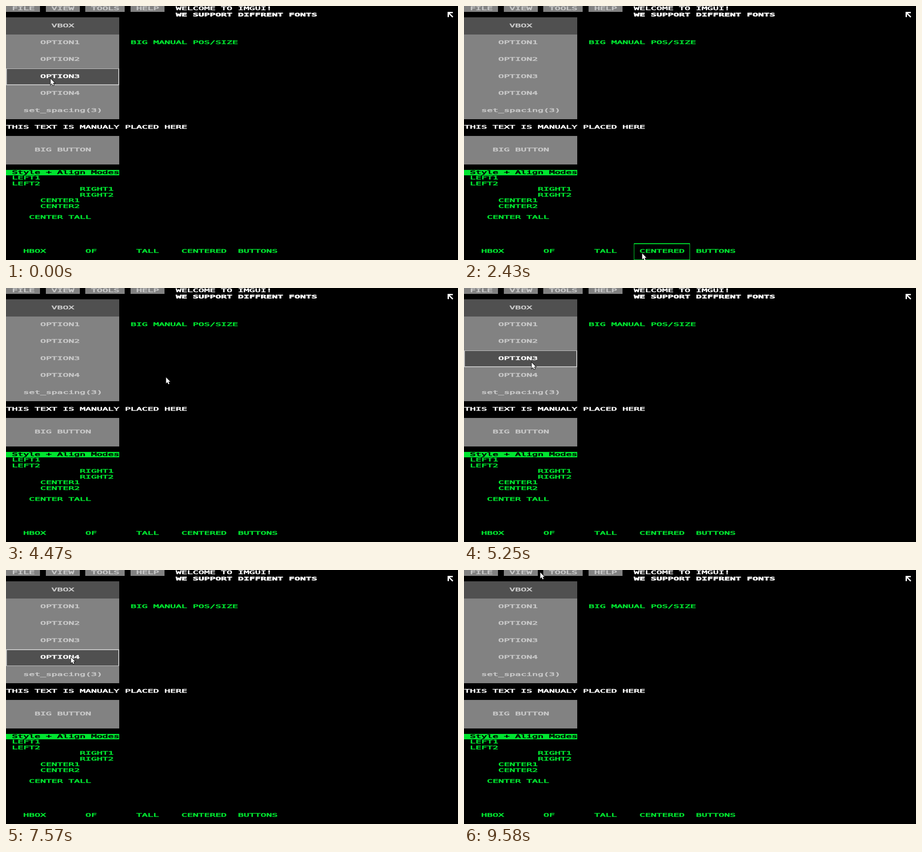
An HTML page with a canvas that plays this animation: 998x561 px, repeating every 9600 ms.

```html
<!DOCTYPE html>
<html lang="en">
<head>
<meta charset="utf-8">
<title>Immediate mode GUI</title>
<style>
  html, body { margin: 0; width: 100%; height: 100%; overflow: hidden; background: #000; }
  canvas { display: block; }
</style>
</head>
<body>
<canvas id="stage"></canvas>
<script>
const canvas = document.getElementById('stage');
const ctx = canvas.getContext('2d');
const W = canvas.width = 998, H = canvas.height = 561;
const U = W / 80, V = H / 45; // character cell
const PX = 1 / 8;             // one screen pixel of the UI, in cells
const LOOP = 9600, STEP = 60;
const GREEN = '#00e430', GRAY = '#828282', DARK = '#505050', LIGHT = '#c8c8c8', WHITE = '#fff';
const FACE = '10.6px "DejaVu Sans Mono", monospace';

// Turning points of the pointer: time, x, y
const path = [
  [0, 98, 160], [1100, 134, 450], [2000, 200, 545], [2490, 425, 546], [3630, 331, 546],
  [4710, 360, 90], [5250, 149, 164], [5790, 140, 371], [6210, 146, 484], [6660, 147, 420],
  [6960, 146, 369], [7570, 143, 192], [8050, 130, 5], [9070, 354, 5], [9580, 168, 5], [LOOP, 168, 5]
];

const inset = {
  left: () => 1,
  right: (label, w) => w - label.length - 1,
  center: (label, w) => Math.floor((w - label.length) / 2)
};

// Immediate-mode widgets; positions are in cells
function ui(pointer) {
  const cx = pointer.x / U, cy = pointer.y / V;

  function label(str, col, row, w, h, color, align = 'center') {
    text(str, col + inset[align](str, w), row + Math.floor((h - 1) / 2), color);
  }

  function button(str, col, row, w, h, filled, align) {
    const hot = cx >= col && cx < col + w && cy >= row && cy < row + h;
    if (filled) box(col, row, w, h, hot ? DARK : GRAY);
    if (hot) frame(col, row, w, h, filled ? LIGHT : GREEN);
    label(str, col, row, w, h, !filled ? GREEN : hot ? WHITE : LIGHT, align);
  }

  function vbox(names, row, h, filled, align) {
    names.forEach((name, i) => button(name, 0, row + i * h, 20, h, filled, align));
  }

  let col = 0;
  for (const name of ['FILE', 'VIEW', 'TOOLS', 'HELP']) {
    button(name, col, 0, name.length + 2, 1, true);
    col += name.length + 3;
  }

  box(0, 2, 20, 3, DARK);
  label('VBOX', 0, 2, 20, 3, LIGHT);
  vbox(['OPTION1', 'OPTION2', 'OPTION3', 'OPTION4', 'set_spacing(3)'], 5, 3, true);
  text('THIS TEXT IS MANUALY PLACED HERE', 0, 21, WHITE);
  vbox(['BIG BUTTON'], 23, 5, true);

  box(0, 29, 20, 1, GREEN);
  text('Style + Align Modes', 1, 29, '#000');
  vbox(['LEFT1', 'LEFT2'], 30, 1, false, 'left');
  vbox(['RIGHT1', 'RIGHT2'], 32, 1, false, 'right');
  vbox(['CENTER1', 'CENTER2'], 34, 1, false);
  vbox(['CENTER TALL'], 36, 3, false);
  ['HBOX', 'OF', 'TALL', 'CENTERED', 'BUTTONS']
    .forEach((name, i) => button(name, i * 10, 42, 10, 3, false));

  button('BIG MANUAL POS/SIZE', 20, 2, 23, 9, false);
  text('WELCOME TO IMGUI!', 30, 0, WHITE);
  text('WE SUPPORT DIFFRENT FONTS', 30, 1, WHITE, true);
}

function text(str, col, row, color, bold) {
  ctx.save();
  ctx.font = (bold ? 'bold ' : '') + FACE;
  ctx.translate(col * U + 0.8, row * V + (bold ? 10.7 : 9.2));
  ctx.scale(U / ctx.measureText('M').width, 1);
  ctx.fillStyle = ctx.strokeStyle = color;
  ctx.lineWidth = 0.6;
  ctx.fillText(str, 0, 0);
  ctx.strokeText(str, 0, 0);
  ctx.restore();
}

function box(col, row, w, h, color) {
  const x = Math.ceil(col * U), y = Math.ceil(row * V);
  ctx.fillStyle = color;
  ctx.fillRect(x, y, Math.ceil((col + w) * U) - x, Math.ceil((row + h) * V) - y);
}

function frame(col, row, w, h, color) {
  box(col, row, w, PX, color);
  box(col, row + h - PX, w, PX, color);
  box(col, row, PX, h, color);
  box(col + w - PX, row, PX, h, color);
}

function cornerArrow(x, y, size) {
  ctx.strokeStyle = WHITE;
  ctx.lineWidth = 3;
  ctx.beginPath();
  ctx.moveTo(x + size, y);
  ctx.lineTo(x, y);
  ctx.lineTo(x, y + size);
  ctx.moveTo(x, y);
  ctx.lineTo(x + size, y + size);
  ctx.stroke();
}

function cursor({ x, y }) {
  ctx.save();
  ctx.translate(x + 0.5, y + 0.5);
  const shape = new Path2D('M0 0V13L3 10.4L5 15L7.2 14L5.2 9.6L9 9.4Z');
  ctx.strokeStyle = '#111';
  ctx.lineWidth = 2;
  ctx.stroke(shape);
  ctx.fillStyle = WHITE;
  ctx.fill(shape);
  ctx.restore();
}

// The pointer rests for one step at each turn, then moves in equal steps
function pointerAt(t) {
  const i = path.findIndex(p => p[0] > t);
  const [t0, x0, y0] = path[i - 1], [t1, x1, y1] = path[i];
  const steps = Math.max(1, Math.floor((t1 - t0) / STEP) - 1);
  const k = Math.max(0, Math.floor((t - t0) / STEP) - 1) / steps;
  const mix = (a, b) => Math.round(a + (b - a) * Math.min(k, 1));
  return { x: mix(x0, x1), y: mix(y0, y1) };
}

function draw(t) {
  const pointer = pointerAt(t);
  ctx.fillStyle = '#000';
  ctx.fillRect(0, 0, W, H);
  ui(pointer);
  cornerArrow(976.5, 14.5, 10);
  cursor(pointer);
}

const start = performance.now();
function tick() {
  draw((performance.now() - start) % LOOP);
  requestAnimationFrame(tick);
}
tick();
</script>
</body>
</html>
```
